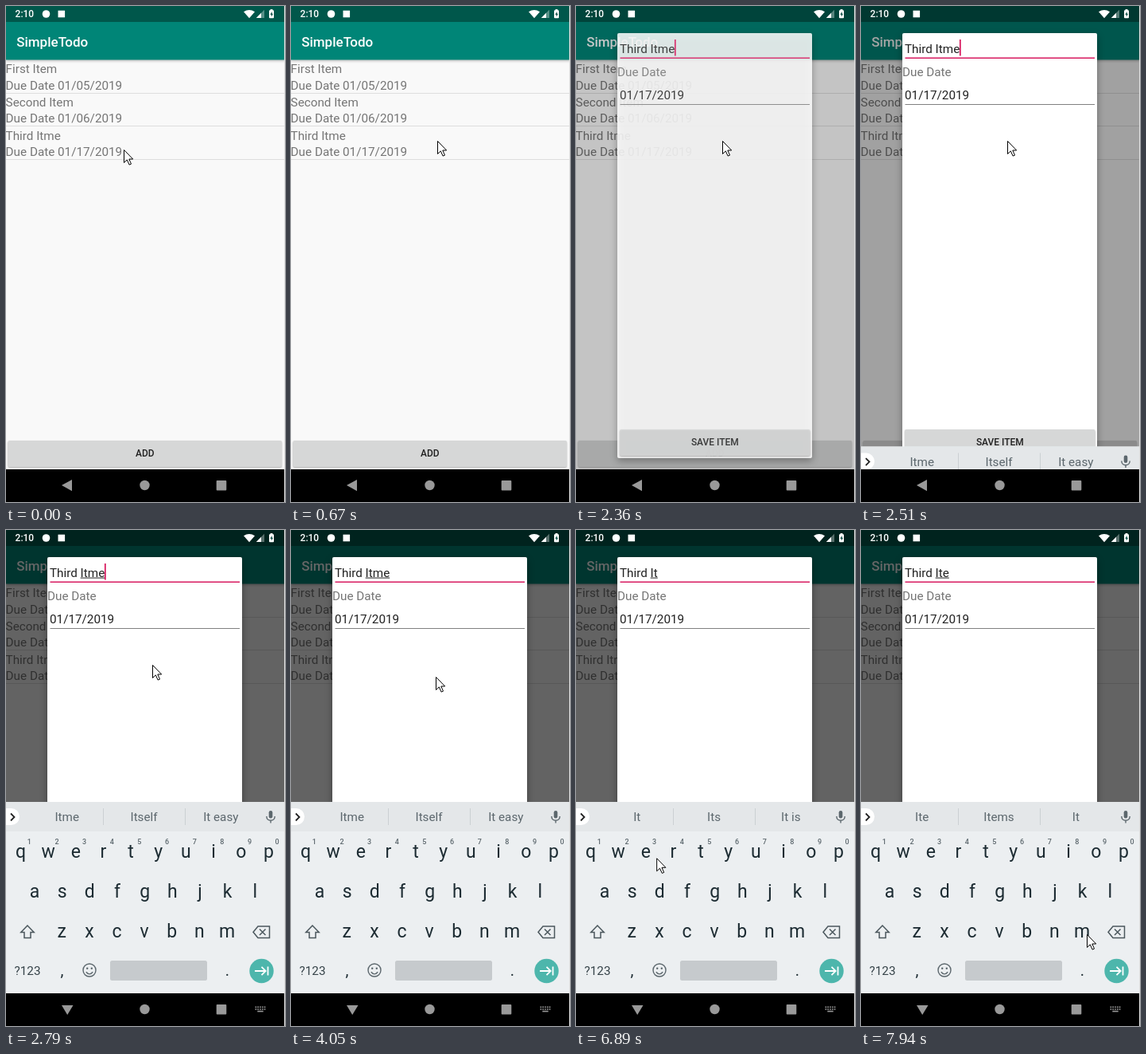
An HTML page with a canvas for the animation above (8000 ms loop, 351x622 px).

```html
<!DOCTYPE html>
<html lang="en">
<head>
<meta charset="utf-8">
<title>To-do app</title>
<style>
html, body { margin: 0; width: 100%; height: 100%; overflow: hidden; background: #000; }
canvas { display: block; }
</style>
</head>
<body>
<canvas id="stage" width="351" height="622"></canvas>
<script>
const c = document.getElementById('stage').getContext('2d');
const LOOP = 8000, ACCENT = '#d81b60', DARK = '#212121', GREY = '#757575';
const BODY = 15.25, FONT = 'Roboto, sans-serif';

const bursts = [[120, 137.5, 5], [1820, 138.6, 8], [2940, 1, 1], [3500, 138.6, 8],
  [4590, 135.7, 8], [5690, 120, 2], [6080, 134.3, 8], [7160, 130, 7]];

// Pointer path: [time, x, y]
const path = [[0, 148, 180], [400, 174, 147], [670, 184, 169], [3450, 184, 169],
  [4050, 182, 184], [4470, 186, 187], [5540, 326, 502], [6080, 326, 502],
  [7020, 88, 406], [7160, 88, 406], [7660, 236, 522], [7940, 284, 507]];

// Edits: [time, word, suggestions]
const edits = [[0, 'Itme', ['Itme', 'Itself', 'It easy']], [5800, 'Itm', ['Itm', 'Item', 'Its']],
  [6080, 'It', ['It', 'Its', 'It is']], [7160, 'Ite', ['Ite', 'Items', 'It']]];

const clamp = v => Math.max(0, Math.min(1, v));
const ease = v => { v = clamp(v); return v * v * (3 - 2 * v); };

function stepTime(t) {
  let s = 0;
  for (const [start, d, n] of bursts)
    if (t >= start) s = start + Math.min(n - 1, Math.floor((t - start + 15) / d)) * d;
  return s;
}

function rect(x, y, w, h, color, r = 0) {
  c.fillStyle = color;
  c.beginPath();
  c.roundRect(x, y, w, h, r);
  c.fill();
}

function disc(x, y, r, color) {
  c.fillStyle = color;
  c.beginPath();
  c.arc(x, y, r, 0, 7);
  c.fill();
}

function shape(d, fill, stroke, width = 1.5) {
  const p = new Path2D(d);
  if (fill) { c.fillStyle = fill; c.fill(p); }
  if (stroke) { c.strokeStyle = stroke; c.lineWidth = width; c.stroke(p); }
}

function text(str, x, y, size, color, align = 'left', weight = 400) {
  c.font = `${weight} ${size}px ${FONT}`;
  c.textAlign = align;
  c.fillStyle = color;
  c.fillText(str, x, y);
}

function shadow(alpha, blur, dy) {
  c.shadowColor = `rgba(0,0,0,${alpha})`;
  c.shadowBlur = blur;
  c.shadowOffsetY = dy;
}

function button(label, x, y, w) {
  shadow(.3, 2, 1);
  rect(x, y, w, 33, '#d6d7d7', 2);
  shadow(0, 0, 0);
  text(label, 174.8, y + 20.3, 11.95, DARK, 'center', 500);
}

function drawApp(s) {
  rect(0, 0, 351, 622, '#f9f9f9');
  shadow(.25, 3, 1);
  rect(0, 20, 351, 47.5, '#008577');
  shadow(0, 0, 0);
  rect(0, 0, 351, 20, '#00574b');
  text('SimpleTodo', 13.2, 50.5, 17, '#fff', 'left', 500);

  if (s >= 1820) {
    c.save();
    c.beginPath();
    c.rect(0, 151, 350, 41.5);
    c.clip();
    disc(175, 172, 149 + (s - 1820) * .4, `rgba(0,0,0,${.12 * (1 - clamp((s - 1960) / 300))})`);
    c.restore();
  }
  [['First Item', '05'], ['Second Item', '06'], ['Third Itme', '17']].forEach(([name, day], i) => {
    const y = 41.75 * i;
    text(name, -.4, 84.2 + y, BODY, GREY);
    text(`Due Date 01/${day}/2019`, -.4, 104.5 + y, BODY, GREY);
    rect(0, Math.round(108.6 + y), 350, 1, '#dedede');
  });
  button('ADD', 2.5, 545, 344.5);
}

function drawDialog(s, word, since) {
  c.globalAlpha = clamp((s - 2130) / 284);
  shadow(.35, 10, 4);
  rect(52, 34, 245, 533, '#fff', 2);
  shadow(0, 0, 0);
  text('Third ' + word, 55, 58.6, BODY, DARK);
  const start = 55 + c.measureText('Third ').width;
  const end = 55 + c.measureText('Third ' + word).width;
  if (s > 2700) rect(start, 59.6, end - start, 1, DARK);
  rect(55.5, 64.6, 238.5, 1.5, ACCENT);
  if (s < since || Math.floor((s - since) / 500) % 2 === 0) rect(end - .3, 42, 1.8, 20.5, ACCENT);
  text('Due Date', 52, 88.4, BODY, GREY);
  text('01/17/2019', 55, 117.2, BODY, DARK);
  rect(55.5, 123, 238.5, 1, '#808080');
  button('SAVE ITEM', 55, 531, 239.5);
  c.globalAlpha = 1;
}

function drawKeyboard(s, tips) {
  const ink = '#1c2b32', soft = '#5c676d';
  c.save();
  c.translate(0, 240 * (1 - ease((s - 2440) / 340)));
  rect(0, 341, 350, 240, '#eceff1');
  rect(0, 341, 350, 37, '#e4e7e9');

  rect(-12, 349, 29, 21, '#fff', 10.5);
  shape('M6 355.5L10.5 360L6 364.5', null, '#222', 1.8);
  tips.forEach((tip, i) => text(tip, 76.7 + 96.8 * i, 365.3, 15.2, soft, 'center'));
  rect(122, 349, 1, 21, '#cbd0d3');
  rect(225, 349, 1, 21, '#cbd0d3');
  rect(330.7, 352, 4.6, 9.5, soft, 2.3);
  shape('M327.8 359C327.8 366 338.2 366 338.2 359M333 364V367.5', null, soft, 1.4);

  if (s >= 5690 && s < 6200) rect(298, 484, 48, 40, '#dde1e3', 2);
  [['qwertyuiop', 18.5, 410.8], ['asdfghjkl', 36, 460.8], ['zxcvbnm', 70.2, 510.8]].forEach(([keys, x, y], row) =>
    [...keys].forEach((key, i) => {
      const kx = x + 34.65 * i;
      text(key, kx, y, 23, ink, 'center');
      if (!row) text((i + 1) % 10, kx + 10.8, 393.5, 9, soft, 'center', 500);
    }));

  shape('M27 496L18.8 504.5H23V511.5H31V504.5H35.2Z', null, '#4b575d');
  shape('M317 497H331.5V511.5H317L311 504.2ZM319 500.5L326.5 508M326.5 500.5L319 508', null, '#4b575d');
  text('?123', 27, 557.7, 15.3, '#37444a', 'center');
  text(',', 70.5, 559, 20, ink, 'center');
  text('.', 278.3, 559, 20, ink, 'center');
  shape('M113 552A8 8 0 1 1 97 552A8 8 0 1 1 113 552M100.8 554.2Q105 559.5 109.2 554.2', null, soft, 1.4);
  disc(102.2, 549.7, 1.2, soft);
  disc(107.8, 549.7, 1.2, soft);
  rect(131, 540, 122, 25, '#c6cacd', 2.5);
  disc(321.5, 553, 15.2, '#4db6ac');
  shape('M313 553H326M321.5 547.8L326.7 553L321.5 558.2M329.5 547.5V558.5', null, '#fff', 1.8);
  c.restore();
}

function drawSystem(keyboard) {
  const grey = '#999';
  rect(0, 581, 351, 41, '#000');
  shape(keyboard ? 'M70 596H84.5L77.2 608Z' : 'M83 594V608.2L70 601Z', grey);
  disc(174.5, 601, 6.2, grey);
  rect(264.7, 595, 12.6, 12.6, grey, 1);
  if (keyboard) {
    for (let i = 0; i < 10; i++) rect(313.5 + i % 5 * 2.8, 597.5 + (i > 4) * 2.7, 1.7, 1.6, grey);
    rect(316.3, 602.8, 7.4, 1.6, grey);
  }

  text('2:10', 11.6, 14.4, 11.95, '#fff', 'left', 500);
  disc(50.5, 10, 4.8, '#fff');
  rect(65.5, 5.7, 8.6, 8.6, '#fff');
  shape('M299 7.3Q306 2.8 313 7.3L306 15.2Z', '#fff');
  shape('M325 4.8V15H314.8Z', 'rgba(255,255,255,.35)');
  shape('M321 8.8V15H314.8Z', '#fff');
  rect(331, 5.2, 6, 10, '#fff', 1);
  rect(332.6, 4, 2.8, 2, '#fff');
  shape('M334.6 7L332.3 10.8H333.8V13.6L336 9.8H334.6Z', '#00463c');
  rect(350, 0, 1, 622, '#e2e2e2');
}

function drawPointer(s) {
  let i = 0;
  while (i < path.length - 2 && s >= path[i + 1][0]) i++;
  const [t0, x0, y0] = path[i], [t1, x1, y1] = path[i + 1];
  const k = ease((s - t0) / (t1 - t0));
  c.save();
  c.translate(x0 + (x1 - x0) * k + .5, y0 + (y1 - y0) * k + .5);
  shape('M0 0V16L3.8 12.4L6.6 18.6L9 17.6L6.3 11.5H11.2Z', '#fff', '#000', 1);
  c.restore();
}

function draw(t) {
  const s = stepTime(t);
  const [since, word, tips] = edits.filter(e => s >= e[0]).pop();
  drawApp(s);
  if (s > 2160) {
    rect(0, 0, 351, 581, `rgba(0,0,0,${Math.min(.6, (s - 2160) / 1000)})`);
    drawDialog(s, word, since || 2440);
  }
  if (s > 2440) drawKeyboard(s, tips);
  drawSystem(s > 2600);
  drawPointer(s);
}

const begin = performance.now();
function tick() {
  draw((performance.now() - begin) % LOOP);
  requestAnimationFrame(tick);
}
tick();
</script>
</body>
</html>
```
